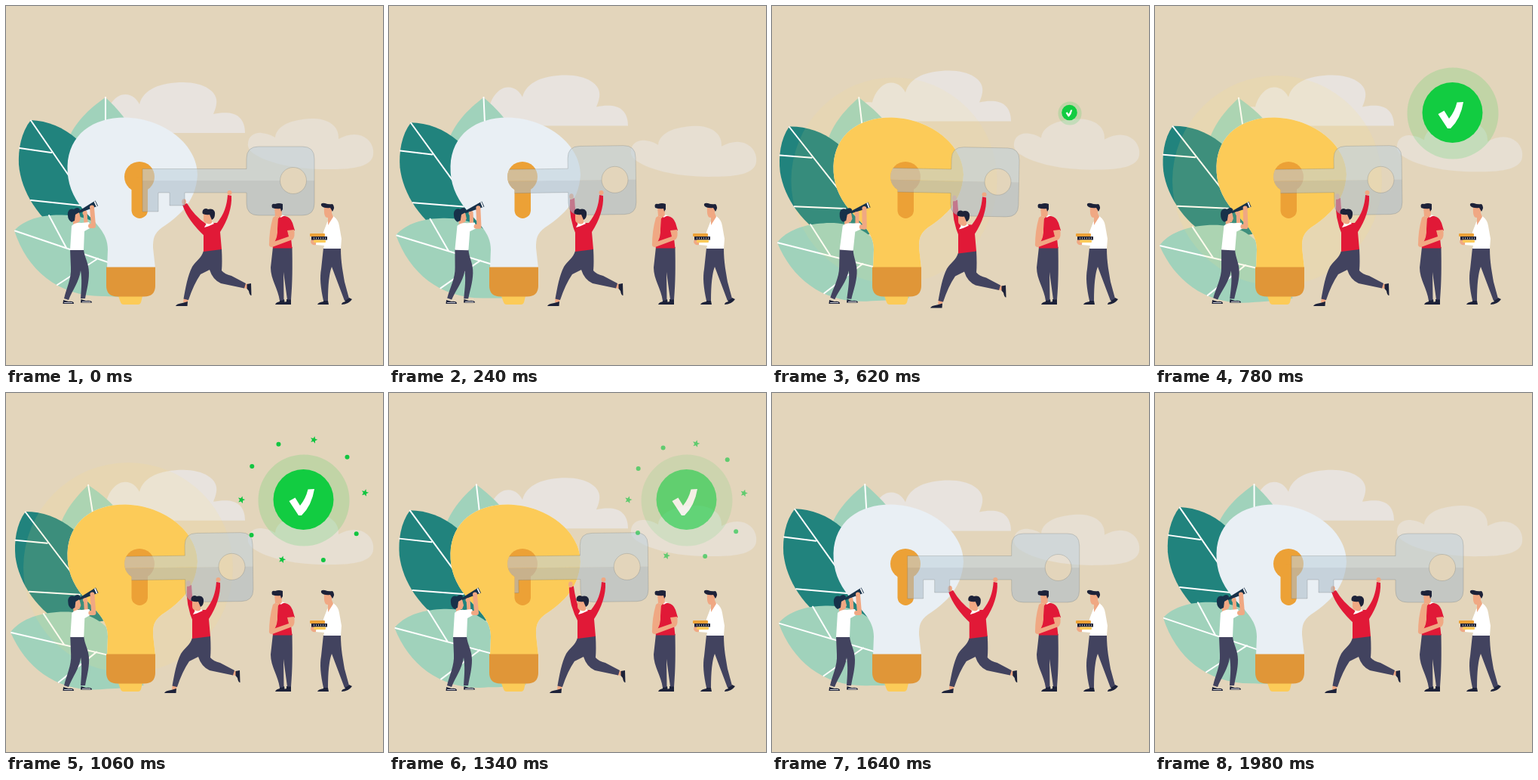
An HTML page that plays this animation: 500x475 px, repeating every 2000 ms.

```html
<!DOCTYPE html>
<html lang="en">
<head>
<meta charset="utf-8">
<title>Key and bulb</title>
<style>
  html, body { margin: 0; width: 100%; height: 100%; overflow: hidden; background: #e3d5bb; }
  svg { display: block; width: 500px; height: 475px; }
  .navy { fill: #42435f; }
  .ink { fill: #1d2239; }
  .deep { fill: #17314a; }
  .skin { fill: #f0a883; }
  .red { fill: #e11937; }
  .white { fill: #fff; }
  .gold { fill: #fccb58; }
  .orange { fill: #eca136; }
  .pale { fill: #a0d2bb; }
  .teal { fill: #21837d; }
  .rib { fill: none; stroke: #fff; stroke-width: 2; stroke-linecap: round; }
  .limb { fill: none; stroke: #f0a883; stroke-linecap: round; stroke-linejoin: round; }
</style>
</head>
<body>
<svg viewBox="0 0 500 475" xmlns="http://www.w3.org/2000/svg">
  <defs>
    <path id="bulbShape" d="M134 347 L135 322 C135 300 119 288 103 270 C88 252 81 234 81.500 212 C83 170 115 147.500 158 147.500 C212 149 254 185 254 223 C252 262 225 281 207 293 C196 301 195 308 195 320 L198 347Z"/>
    <g id="hole">
      <circle cx="177" cy="226" r="20"/>
      <rect x="166.500" y="226" width="21.500" height="55" rx="10.700"/>
    </g>
    <clipPath id="slot">
      <rect x="177" y="0" width="323" height="475"/>
      <circle cx="177" cy="226" r="20"/>
      <rect x="166.500" y="226" width="21.500" height="55" rx="10.700"/>
    </clipPath>
    <clipPath id="upper"><rect x="170" y="170" width="260" height="61"/></clipPath>
    <clipPath id="lower"><rect x="170" y="231" width="260" height="60"/></clipPath>
    <path id="keyShape" fill-rule="evenodd" d="M181 215.500 H319 V202 Q319 186 335 186 H393 Q409 186 409 202 V261 Q409 277 393 277 H335 Q319 277 319 261 V247 H237 V264 H217 V247 H202 V272 H181Z M363.500 231 a17.500 17.500 0 1 0 35 0 a17.500 17.500 0 1 0 -35 0Z"/>
  </defs>

  <path id="cloudA" fill="#e8e3de" d="M317 168 H105 C106 150 115 141 133 143 C137 128 147 117 158 117 C168 117 174 124 177 130 C182 110 205 101 235 101 C262 101 282 113 279 130 C278 136 276 140 275 143 C290 140 303 141 309 147 C315 152 317 160 317 168Z"/>
  <path id="cloudB" fill="#e7dfd2" d="M321 181 C322 172 330 167 339 168 C347 169 352 171 357 174 C359 156 384 149 409 149 C432 150 442 162 441 176 C455 168 470 168 479 176 C486 182 488 190 487 197 C485 212 462 216 432 216 C392 217 350 210 328 195 C323 191 320 187 321 181Z"/>

  <g id="leafTop">
    <path class="pale" d="M132 121 C110 136 91 154 82 178 C78 205 95 240 126 262 C160 240 178 205 171 172 C163 153 148 136 132 121Z"/>
    <path class="rib" d="M132 121 V200"/>
  </g>
  <g id="leafDark">
    <path class="teal" d="M33 151 C20 167 16 190 17 210 C20 245 43 284 82 306 L130 300 C140 250 122 203 95 177 C76 160 55 152 33 151Z"/>
    <path class="rib" d="M33 151.500 L112 266 M18 188 L60 194 M33 257 L100 264"/>
  </g>
  <g id="leafLow">
    <path class="pale" d="M11 297 C25 282 48 276 74 276.500 C108 277 134 289 148 318 L170 350 L180 384 C165 385 145 385 130 384 C70 385 28 350 11 297Z"/>
    <path class="rib" d="M12 297.500 L150 344 M57 277 L80 320 M68 369 L122 334"/>
  </g>

  <circle id="glow" cx="162" cy="231" fill="#fadf75"/>

  <path class="gold" d="M149 384 H181 L179 392 Q178 395 175 395 H156 Q153 395 152 392Z"/>
  <use href="#bulbShape" fill="#e9eff4"/>
  <use id="lit" href="#bulbShape" fill="#fccb58"/>
  <path fill="#e09638" d="M133 345.500 H198 V370 Q198 384.500 183 384.500 H148 Q133 384.500 133 370Z"/>
  <use href="#hole" class="orange"/>

  <!-- lookout -->
  <g id="lookout">
    <path class="navy" d="M85 322 H103 C104 333 110 340 110 353 C110 366 107 375 105 387 H99 C100 373 101 362 99 350 C97 365 88 376 83 389 L77 387 C80 374 87 360 86 346Z"/>
    <path class="limb" stroke-width="5" d="M106 288 L105 273"/>
    <path class="skin" d="M89 274 L97 273 L99 281 L97 286 H95 V289 H89Z"/>
    <path class="white" d="M87 291 Q92 286 100 287 L110 286 L113 293 L104 298 L103 323 H85Z"/>
    <path class="limb" stroke-width="6" d="M112 291 L116 291 L114 267"/>
    <path class="deep" d="M82 277 C81 270 86 267 90 269 Q95 265 98 269 L97 273 L92 276 L91 284 L87 286 Q82 283 82 277Z"/>
    <path class="deep" d="M96 271.500 L118.500 257.500 L122 264.500 L97 274Z"/>
    <path class="white" d="M116.500 259 L118 258 L121 264.700 L119.500 265.300Z"/>
    <circle class="skin" cx="114" cy="266.500" r="3"/>
    <circle class="skin" cx="104" cy="274" r="2.500"/>
  </g>
  <path class="ink" d="M76 389 L83 391 Q90 390 90 394 H75.500Z M99.500 388 L106 390 Q114 389 114 392.500 H99Z"/>
  <path stroke="#fff" stroke-width=".8" d="M77 392.500 H88 M101 391.300 H112"/>

  <g id="armBack">
    <path id="sleeve" class="red"/>
    <ellipse id="palm" class="skin" rx="2.800" ry="3.800"/>
  </g>

  <g clip-path="url(#slot)">
    <g id="key">
      <use href="#keyShape" clip-path="url(#upper)" fill="rgba(194,210,220,.58)"/>
      <use href="#keyShape" clip-path="url(#lower)" fill="rgba(175,190,202,.58)"/>
      <use href="#keyShape" fill="none" stroke="rgba(95,100,95,.4)" stroke-width=".6"/>
    </g>
  </g>

  <!-- runner -->
  <g id="runner">
    <path class="skin" d="M236 386 L242 388 L240 393 L235 392Z M315 367 L321 368 L320 374 L314 373Z"/>
    <path class="ink" d="M241 391 L240.500 397 H225 Q226 394 234 393Z M319.500 368 L325 367 L325.500 383 Q323 383 322 377 L319.500 374Z"/>
    <path class="navy" d="M262 324 L286 321 Q287 340 286 350 Q290 355 299 357 L318 367 L316 373.500 L285 367 Q274 362 270 349 L258 355 Q249 368 242 389 L235.500 387.500 C238 374 241 356 247 345 C252 337 259 334 262 324Z"/>
    <path class="red" d="M262 293 Q266 286 280 287 C289 276 293 264 294 250 L299 251 C300 266 294 284 284 299 L286 322 L262 325Z"/>
    <circle class="skin" cx="296.500" cy="247" r="3"/>
    <path class="white" d="M264 291 Q267 286 274 286 L276 288 Q268 292 263 293Z"/>
    <path class="skin" d="M262 275 L273 274 V287 Q269 290 266 287 Q262 287 262 282Z"/>
    <path class="ink" d="M261 275 C259 270 264 266 268 269 C274 267 278 271 277 276 Q277 281 273 283 L270 276 Q266 277 261 275Z"/>
  </g>

  <!-- thinker -->
  <g>
    <path class="ink" d="M363 389 L369 388 L370 395 H357 Q358 392 363 391Z M372 388 H378 V395 H365 Q366 392 372 391Z"/>
    <path class="navy" d="M354 319 H379.500 C380 345 380 365 378 388.500 H373 L368 352 L368.500 389 L363 390 C361 374 351 362 351 346Z"/>
    <path class="red" d="M355 282 Q361 276 370 278 Q377 279 380 287 L383 297 L377 299 L379.500 320.500 H354 L351 300Z"/>
    <path class="white" d="M363 276 L370 277 L364 280Z"/>
    <path class="skin" d="M356 266 H366 V272 Q365 275 366 277 L360 282 V278 H357Z"/>
    <path class="skin" d="M354 280 Q358 276 361 280 L360 295 Q361 306 354 316 L349 316 Q349 297 354 280Z"/>
    <path class="skin" d="M373 297 L382 296 Q384 305 380 309 L353 319 Q348 319 349 314 L375 305Z"/>
    <path class="ink" d="M353 267 Q351 261 357 262 Q362 260 367 262 L367 269 L365 272 L364 268 Q358 269 353 267Z"/>
  </g>

  <!-- reader -->
  <g>
    <path class="ink" d="M421 389 L427 390 L428 395 H413 Q414 392 421 391Z M449 389 L455 386 L459 388 Q454 395 445 395 Q445 392 450 391Z"/>
    <path class="navy" d="M421 320 H444 C444 340 447 352 449 365 L455 387 L449 390 L432 345 Q427 358 427 390 H421 C417 372 416 359 418 348Z"/>
    <path class="white" d="M426 286 L434 278 Q441 283 442 291 L445 308 L444 321 H421 L422 317 L411 316 L412 310 H422 L421 299Z"/>
    <path class="skin" d="M422 266 H432 V274 L434 279 L427 290 L427 280 Q421 281 422 266Z"/>
    <path class="ink" d="M418 264 Q417 260 423 261 Q428 263 433 262 Q437 266 433 272 L430 267 Q421 268 418 264Z"/>
    <path class="skin" d="M405 309 H411 V316 Q405 317 404 312Z"/>
    <rect x="403" y="301" width="20" height="4" rx="1" class="orange"/>
    <rect x="405" y="305" width="21" height="4.500" class="ink"/>
    <path d="M408 307.200 H425" stroke="#bfb8b2" stroke-width="2" stroke-dasharray="1 2"/>
    <rect x="408" y="309.500" width="16" height="3.500" rx="1" class="gold"/>
  </g>

  <g id="badge">
    <circle id="halo" cx="395" cy="142" fill="#12cc41" opacity=".165"/>
    <g id="confetti" fill="#12c541"></g>
    <g id="disc">
      <circle r="40" fill="#12cc41"/>
      <path class="white" d="M-19 2 L-11 -2.500 L-4.500 8 Q3 -1 6 -13.500 L14.500 -14 Q11 8 -2.500 21 H-6.500Z"/>
    </g>
  </g>
</svg>
<script>
  const LOOP = 2000, BITS = 10;
  const $ = id => document.getElementById(id);
  const set = (id, name, value) => $(id).setAttribute(name, value);
  const move = (id, value) => set(id, 'transform', value);
  const mix = (a, b, k) => a + (b - a) * k;

  // Smooth step from 0 to 1 between two times
  const ramp = (t, from, to) => {
    const k = Math.min(1, Math.max(0, (t - from) / (to - from)));
    return (1 - Math.cos(Math.PI * k)) / 2;
  };
  // Straight rise to 1 at peak, straight fall to 0 at the loop's end
  const hill = (t, peak) => t < peak ? t / peak : (LOOP - t) / (LOOP - peak);

  const starPath = Array.from({ length: 10 }, (_, i) => {
    const r = i % 2 ? 2.2 : 5, a = i * Math.PI / 5 - 1.3;
    return `${i ? 'L' : 'M'}${r * Math.cos(a)} ${r * Math.sin(a)}`;
  }).join('') + 'Z';
  const dotPath = 'M-3 0a3 3 0 1 0 6 0a3 3 0 1 0-6 0Z';

  const bits = Array.from({ length: BITS }, (_, i) => {
    const el = document.createElementNS('http://www.w3.org/2000/svg', 'path');
    el.setAttribute('d', i % 5 === 2 || i % 5 === 4 ? starPath : dotPath);
    $('confetti').append(el);
    const step = 2 * Math.PI * i / BITS;
    const angle = step - 2.57 - .09 * Math.sin(step);
    const reach = 77 + 2 * Math.sin(angle);
    return { el, x: reach * Math.cos(angle), y: reach * Math.sin(angle) };
  });

  function drawScenery(t) {
    const drift = 18.5 - 38.5 * hill((t + 460) % LOOP, 960);
    const bob = 12 * Math.sin(3 * Math.PI * t / LOOP) ** 2;
    move('cloudA', `translate(0 ${drift})`);
    move('cloudB', `translate(0 ${bob})`);
    move('leafTop', `rotate(${-10.2 * hill(t, 950)} 126 265)`);
    move('leafDark', `rotate(${-3.8 * hill(t, 640)} 160 312)`);
    move('leafLow', `rotate(${-6.5 * hill(t, 900)} 210 358)`);
    set('lit', 'opacity', ramp(t, 400, 460) - ramp(t, 1430, 1520));
    set('glow', 'opacity', .13 * (ramp(t, 400, 740) - ramp(t, 1000, 1360)));
    set('glow', 'r', 125 + 14 * ramp(t, 300, 740));
  }

  function drawPeople(t) {
    const lean = 4.2 * (ramp(t, 0, 500) - ramp(t, 500, 1150));
    move('lookout', `rotate(${lean} 95 392)`);

    const push = ramp(t, 0, 240) - ramp(t, 1200, 1680);
    const press = ramp(t, 240, 500) - ramp(t, 500, 780);
    move('key', `rotate(${3.2 * press - .8 * push} 215 231) translate(${-81.5 * push} 0)`);
    const step = `translate(${-15 * push} ${4 * press})`;
    move('runner', step);
    move('armBack', step);

    const hx = mix(236, 257, push), hy = mix(259, 252, push);
    const ex = mix(246, 258, push), ey = mix(282, 278, push);
    set('sleeve', 'd', `M${hx - 2} ${hy + 4} Q${ex - 5} ${ey + 2} 264 305 L265 288 Q${ex + 4} ${ey - 4} ${hx + 4} ${hy + 2}Z`);
    set('palm', 'cx', hx);
    set('palm', 'cy', hy);
  }

  function drawBadge(t) {
    const pop = ramp(t, 560, 740);
    const launch = ramp(t, 770, 1000);
    const spread = .5 + .58 * launch - .08 * ramp(t, 1000, 1250);
    set('badge', 'opacity', 1 - ramp(t, 1180, 1560));
    set('halo', 'r', 60.5 * pop);
    move('disc', `translate(394.5 141) scale(${pop})`);
    for (const { el, x, y } of bits) {
      el.setAttribute('transform',
        `translate(${394.5 + x * spread} ${141 + y * spread}) scale(${launch})`);
    }
  }

  const start = performance.now();
  function frame() {
    const t = (performance.now() - start) % LOOP;
    drawScenery(t);
    drawPeople(t);
    drawBadge(t);
    requestAnimationFrame(frame);
  }
  frame();
</script>
</body>
</html>
```
